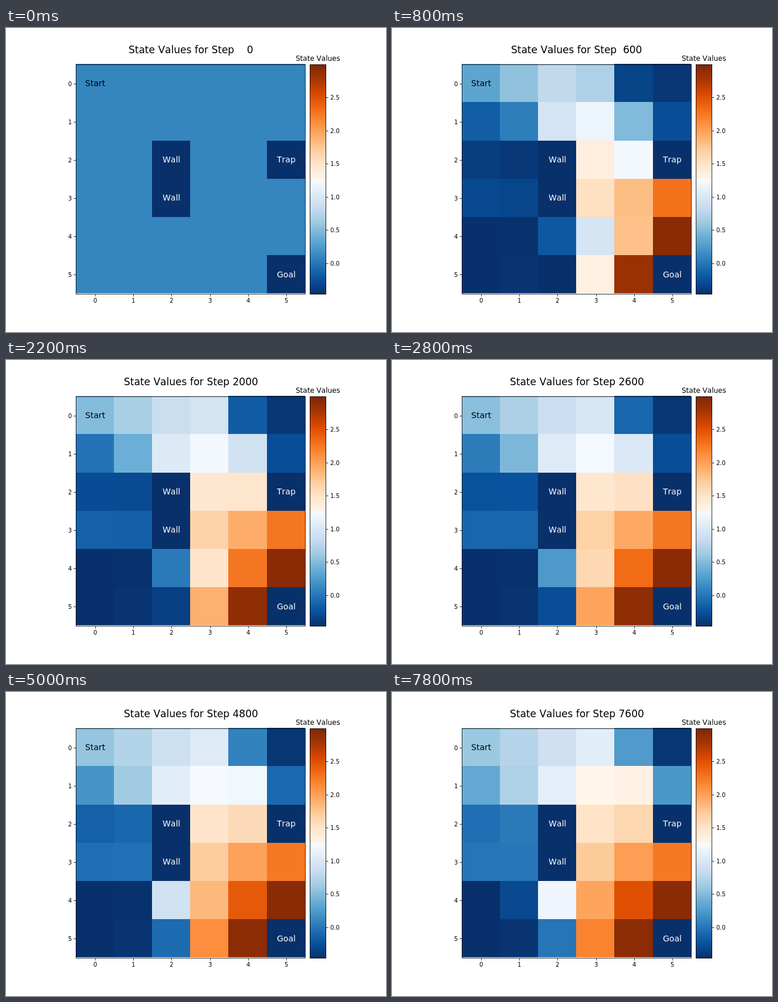
Write an HTML page with a canvas that moves like this. It is 648x518 px and loops after 8000 ms.

```html
<!DOCTYPE html>
<html lang="en">
<head>
<meta charset="utf-8">
<title>State Values</title>
<style>
  html, body { margin: 0; width: 100%; height: 100%; overflow: hidden; background: #fff; }
  canvas { display: block; }
</style>
</head>
<body>
<canvas id="stage" width="648" height="518"></canvas>
<script>
const ctx = document.getElementById('stage').getContext('2d');
const LOOP = 8000, FRAME = 200, STEPS_PER_FRAME = 200;
const V_MIN = -0.463, V_MAX = 2.996, V_START = 0.1;
const CELL = 65.17, LINE = 0.8;

const colEdge = c => Math.floor(119.2 + c * CELL);
const rowEdge = r => Math.floor(61.8 + r * CELL);
const colCentre = c => 152.08 + c * CELL;
const rowCentre = r => 94.6 + r * CELL;

// Two sequential ramps joined at the middle of the value range.
const BLUES = ['08306b', '08519c', '2171b5', '4292c6', '6baed6', '9ecae1', 'c6dbef', 'deebf7', 'f7fbff'];
const ORANGES = ['fff5eb', 'fee6ce', 'fdd0a2', 'fdae6b', 'fd8d3c', 'f16913', 'd94801', 'a63603', '7f2704'];

// A cell's value saturates from its first estimate towards a limit; `half` is
// the number of steps to get halfway and `sharpness` makes the rise more sudden.
const learn = (first, limit, half, sharpness = 1) => steps =>
  first + (limit - first) / (1 + (half / Math.max(steps, 1)) ** sharpness);
const fast = (first, limit) => learn(first, limit, 650);
const steady = (first, limit) => learn(first, limit, 1600);
const slow = (first, limit) => learn(first, limit, 12000);
const flat = value => () => value;
const blocked = null;

const GRID = [
  [fast(.14, .64), fast(.43, .77), fast(.73, .92), fast(.45, 1.13), slow(-.39, 1.31), flat(-.42)],
  [slow(-.21, 1.28), steady(-.16, .9), steady(.92, 1.13), steady(1.14, 1.3), steady(.23, 1.55), learn(-.27, .25, 5000, 8)],
  [slow(-.4, .54), slow(-.45, .81), blocked, fast(1.25, 1.54), fast(.93, 1.69), blocked],
  [steady(-.39, .08), steady(-.42, .1), blocked, fast(1.4, 1.76), steady(1.75, 2.08), fast(2.33, 2.25)],
  [flat(-.46), learn(-.45, -.25, 7000, 20), learn(-.2, 1.3, 3200, 3), steady(.64, 2.27), fast(1.29, 2.62), flat(2.94)],
  [flat(-.46), flat(-.43), learn(-.46, .02, 2800, 3), fast(.74, 2.32), fast(2.79, 2.94), blocked]
];

const mix = (a, b, k) => a + (b - a) * k;

function colour(value) {
  const pos = Math.min(Math.max((value - V_MIN) / (V_MAX - V_MIN), 0), 1) * 16;
  const ramp = pos < 8 ? BLUES : ORANGES;
  const x = pos < 8 ? pos : pos - 8;
  const i = Math.min(Math.floor(x), 7);
  const channel = c => {
    const part = hex => parseInt(hex.slice(c * 2, c * 2 + 2), 16);
    return Math.round(mix(part(ramp[i]), part(ramp[i + 1]), x - i));
  };
  return `rgb(${channel(0)},${channel(1)},${channel(2)})`;
}

function cellValue(cell, frame) {
  if (!cell) return V_MIN;
  if (frame < 2) return mix(V_START, cell(0), frame * 0.15);
  return cell((frame - 2) * STEPS_PER_FRAME);
}

// Starts each string on a whole pixel; anchor is 0 left, 0.5 centre, 1 right.
function text(str, x, y, size, anchor = 0.5, fill = '#000') {
  ctx.font = `${size}px "DejaVu Sans", sans-serif`;
  ctx.fontKerning = 'none';
  ctx.fillStyle = fill;
  ctx.fillText(str, Math.round(x - ctx.measureText(str).width * anchor), Math.round(y));
}

function box(x, y, w, h, fill = '#000') {
  ctx.fillStyle = fill;
  ctx.fillRect(x, y, w, h);
}

function outline(x, y, w, h) {
  ctx.lineWidth = LINE;
  ctx.strokeStyle = '#000';
  ctx.strokeRect(x, y, w, h);
}

function drawCells(frame) {
  GRID.forEach((row, r) => row.forEach((cell, c) => {
    const x = colEdge(c), y = rowEdge(r);
    box(x, y, colEdge(c + 1) - x, rowEdge(r + 1) - y, colour(cellValue(cell, frame)));
  }));
  const label = (str, c, r, fill = '#fff') => text(str, colCentre(c), rowCentre(r) + 4.3, 14, 0.5, fill);
  label('Start', 0, 0, '#000');
  label('Wall', 2, 2);
  label('Wall', 2, 3);
  label('Trap', 5, 2);
  label('Goal', 5, 5);
}

function drawAxes() {
  outline(119.5, 62.5, 391, 391);
  for (let i = 0; i < 6; i++) {
    const x = Math.round(colCentre(i)), y = Math.round(rowCentre(i));
    box(x + 0.1, 454, LINE, 3.5);
    box(115.5, y + 0.1, 3.5, LINE);
    text(i, x + 0.3, 468, 10);
    text(i, 112, y + 4, 10, 1);
  }
}

function drawColourBar() {
  for (let y = 62; y < 454; y++) box(518, y, 28, 1, colour((401 - y) / 113));
  outline(518.5, 62.5, 27, 391);
  for (let i = 0; i < 6; i++) {
    const y = Math.floor(401 - i * 56.5);
    box(546, y + 0.1, 3.5, LINE);
    text((i / 2).toFixed(1), 552.6, y + 4, 10, 0);
  }
  text('State Values', 531.9, 56, 12);
}

function draw(time) {
  const frame = Math.floor((time % LOOP) / FRAME);
  const step = Math.max(0, frame - 1) * STEPS_PER_FRAME;
  box(0, 0, 648, 518, '#fff');
  drawCells(frame);
  drawAxes();
  drawColourBar();
  text('State Values for Step ' + String(step).padStart(4), 315.2, 43, 17);
}

const start = performance.now();
function tick() {
  draw(performance.now() - start);
  requestAnimationFrame(tick);
}
tick();
</script>
</body>
</html>
```
